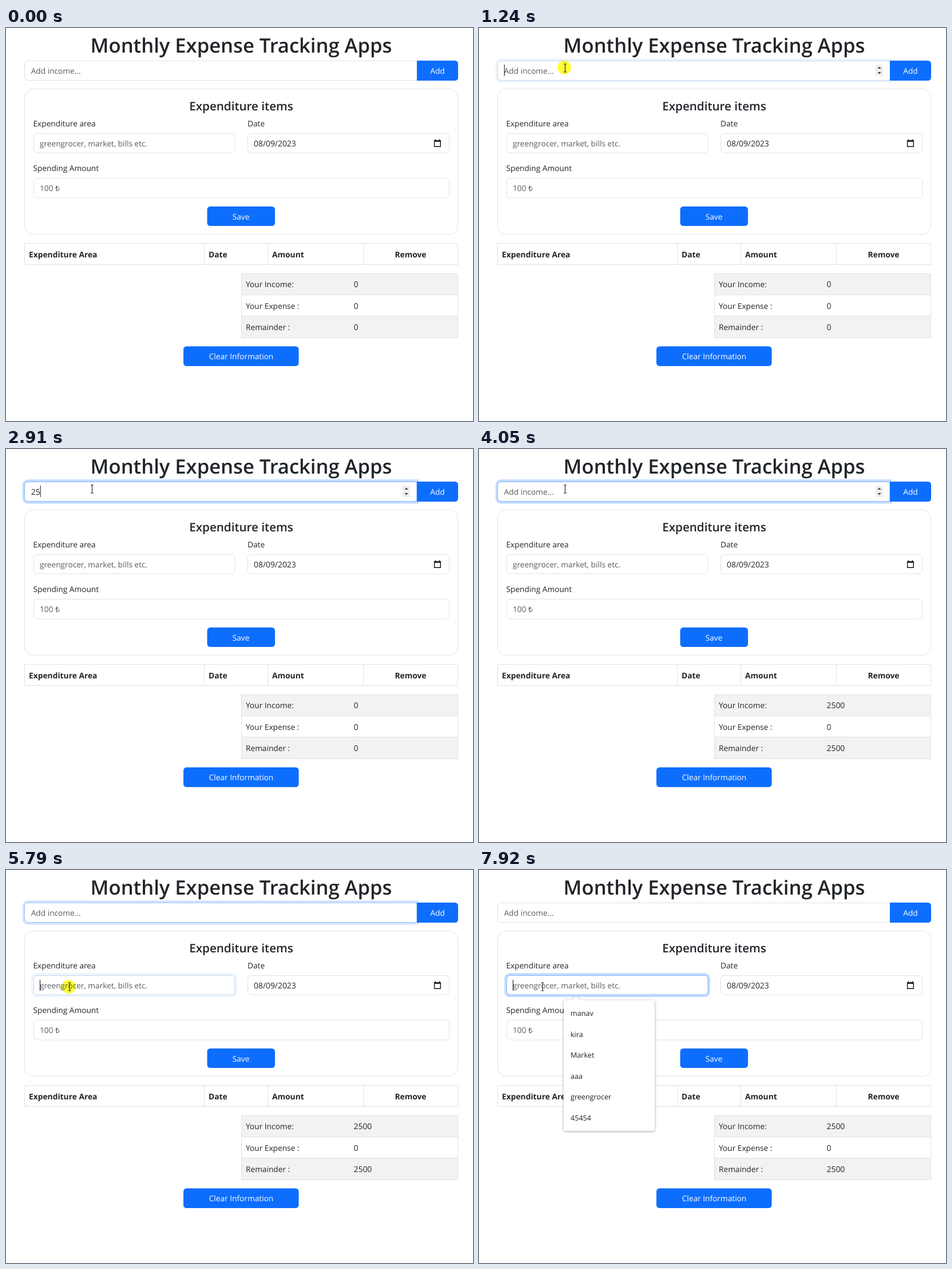
An HTML page that plays this animation: 816x687 px, repeating every 8000 ms.

```html
<!DOCTYPE html>
<html lang="en">
<head>
<meta charset="utf-8">
<title>Monthly Expense Tracking Apps</title>
<style>
html, body { margin: 0; width: 100%; height: 100%; overflow: hidden; background: #fff; }
svg { display: block; width: 816px; height: 687px; }
text { font: 13.7px "Open Sans", "Noto Sans", sans-serif; fill: #212529; text-rendering: geometricPrecision; }
.mid { text-anchor: middle; }
.h1 { font-size: 34.6px; font-weight: 600; }
.h2 { font-size: 20.6px; font-weight: 600; }
.th text { font-weight: 700; font-size: 13.8px; }
.num { font-size: 13.9px; }
.hint { fill: #595c5f; }
.box { fill: #fff; stroke: #dee2e6; }
.line { fill: none; stroke: #dee2e6; }
.btn { fill: #0d6efd; }
.label { fill: #fff; }
.ring .glow { fill: none; stroke: #c2dbfe; stroke-width: 3.7; }
.ring .edge { fill: none; stroke: #86b7fe; }
.caret { fill: #111; }
#menu text { font-size: 12.6px; fill: #202124; }
#menu .panel { fill: #fff; filter: drop-shadow(0 1px 2px rgba(0,0,0,.35)); }
</style>
</head>
<body>
<svg viewBox="0 0 816 687">
  <text class="h1 mid" x="411" y="43">Monthly Expense Tracking Apps</text>

  <path class="box" d="M718 57.5H38a5.5 5.5 0 0 0-5.5 5.5V86a5.5 5.5 0 0 0 5.5 5.5H718z"/>
  <g class="ring" id="ring1">
    <path class="glow" d="M719.5 55.2H38a7.5 7.5 0 0 0-7.3 7.5V86a7.5 7.5 0 0 0 7.3 7.6H719.5z"/>
    <path class="edge" d="M718 57.5H38a5.5 5.5 0 0 0-5.5 5.5V86a5.5 5.5 0 0 0 5.5 5.5H718z"/>
  </g>
  <path class="btn" d="M718 57H784.5a5.5 5.5 0 0 1 5.5 5.5V86.5a5.5 5.5 0 0 1-5.5 5.5H718z"/>
  <text class="label mid" x="754" y="80">Add</text>
  <g id="spin">
    <rect x="692" y="64" width="14" height="20" fill="#efefef"/>
    <path d="M696.3 71l3.2-3.6 3.2 3.6zM696.3 77l3.2 3.6 3.2-3.6z" fill="#444"/>
  </g>
  <text id="income" x="43.7" y="80"></text>
  <rect class="caret" id="caret1" y="64" width="1" height="20"/>

  <rect class="box" x="32.5" y="106.5" width="757" height="254" rx="14.5"/>
  <text class="h2 mid" x="411" y="143.5">Expenditure items</text>
  <text x="47.5" y="172">Expenditure area</text>
  <text x="422" y="172">Date</text>
  <text x="47.5" y="249.5">Spending Amount</text>
  <rect class="box" x="48.5" y="184.5" width="351.5" height="33.5" rx="5.5"/>
  <g class="ring" id="ring2">
    <rect class="glow" x="46.2" y="182.2" width="355.8" height="38.1" rx="7.3"/>
    <rect class="edge" x="48.5" y="184.5" width="351.5" height="33.5" rx="5.5"/>
  </g>
  <text class="hint" x="59" y="207">greengrocer, market, bills etc.</text>
  <rect class="caret" id="caret2" x="59" y="192" width="1" height="19"/>
  <rect class="box" x="422.5" y="184.5" width="352" height="33.5" rx="5.5"/>
  <text class="num" x="433" y="207">08/09/2023</text>
  <path d="M748.6 196.6h10.6v10.6h-10.6zM748.6 198.3h10.6M750.5 194.5v2M757.3 194.5v2" fill="none" stroke="#111" stroke-width="1.4"/>
  <rect class="box" x="48.5" y="262.5" width="726" height="34.5" rx="5.5"/>
  <text class="hint" x="59" y="285">100 ₺</text>
  <rect class="btn" x="351.5" y="312" width="118.5" height="34" rx="5.5"/>
  <text class="label mid" x="410.5" y="334.5">Save</text>

  <path class="line" d="M32.5 376.5H789.5V413.5H32.5zM346.5 376.5V413.5M457.5 376.5V413.5M624.5 376.5V413.5"/>
  <g class="th">
    <text x="40" y="400.5">Expenditure Area</text>
    <text x="354" y="400.5">Date</text>
    <text x="465" y="400.5">Amount</text>
    <text class="mid" x="707" y="400.5">Remove</text>
  </g>

  <path d="M411 429h379v37.5H411zM411 503.5h379V541.5H411z" fill="#f2f2f2"/>
  <path class="line" d="M411.5 429.5H789.5V541.5H411.5zM411.5 466.5H789.5M411.5 503.5H789.5"/>
  <text x="419" y="453">Your Income:</text>
  <text x="419" y="490.5">Your Expense :</text>
  <text x="419" y="528">Remainder :</text>
  <text class="num total" x="607.5" y="453">0</text>
  <text class="num" x="607.5" y="490.5">0</text>
  <text class="num total" x="607.5" y="528">0</text>

  <rect class="btn" x="310" y="556.5" width="201.5" height="34.5" rx="5.5"/>
  <text class="label mid" x="411" y="579">Clear Information</text>

  <g id="menu">
    <path class="panel" d="M151 227.5H162.5L169.5 220.5 176.5 227.5H304a3 3 0 0 1 3 3V453a3 3 0 0 1-3 3H151a3 3 0 0 1-3-3V230.5a3 3 0 0 1 3-3z"/>
  </g>

  <circle id="click" r="12" fill="#ffff3c" style="mix-blend-mode:multiply"/>
  <path id="arrow" d="M.5.5V14L3.7 11 5.9 15.8 7.9 14.9 5.7 10.2H10z" fill="#fff" stroke="#111" stroke-width=".9"/>
  <path id="beam" d="M-2.5-7h2l.5.5.5-.5h2M0-6.5V6.5M-2.5 7h2l.5-.5.5.5h2" fill="none" stroke="#222" stroke-width="1.1"/>
</svg>
<script>
const LOOP = 8000, SVG = "http://www.w3.org/2000/svg";
const el = id => document.getElementById(id);
const show = (id, on) => el(id).style.display = on ? "" : "none";
const within = (t, a, b) => t >= a && t < b;
const place = (id, x, y) => el(id).setAttribute("transform", `translate(${x} ${y})`);

["manav", "kira", "Market", "aaa", "greengrocer", "45454"].forEach((word, i) => {
  const item = document.createElementNS(SVG, "text");
  item.setAttribute("x", 160);
  item.setAttribute("y", 255 + 36.5 * i);
  item.textContent = word;
  el("menu").append(item);
});

// pointer path: time, x, y
const path = [
  [70, 735, 665], [140, 650, 530], [200, 567, 410], [270, 466, 300], [400, 290, 112],
  [560, 185, 32], [700, 155, 50], [830, 150.5, 65], [899, 150.5, 65], [900, 150.5, 70],
  [4900, 150.5, 70], [5110, 128, 98], [5310, 111, 150], [5520, 107, 212], [5660, 111, 204]
];
const keys = [[2710, "2"], [2910, "25"], [3300, "250"], [3430, "2500"], [4050, ""]];
// moments at which the caret turns on, then off
const blinks1 = [[1240, 1780], [2310, 3980], [4510, 5040], [5570, 5790]];
const blinks2 = [[5790, 6330], [6860, 7410], [7920, LOOP]];

function pointer(t) {
  const i = path.findIndex(k => k[0] > t);
  if (i < 0) return path.at(-1).slice(1);
  const [t0, x0, y0] = path[i - 1], [t1, x1, y1] = path[i];
  const p = (t - t0) / (t1 - t0);
  return [x0 + (x1 - x0) * p, y0 + (y1 - y0) * p];
}

// ring fades in and out over 150 ms
const fade = (t, on, off) =>
  Math.max(0, Math.min(1, (t - on + 40) / 150, (off + 110 - t) / 150));

function draw(t) {
  const typed = (keys.findLast(k => k[0] <= t) || [0, ""])[1];
  const income = el("income");
  income.textContent = typed || "Add income...";
  income.setAttribute("class", typed ? "num" : "hint");
  el("caret1").setAttribute("x", 43.8 + typed.length * 7.95);
  document.querySelectorAll(".total").forEach(n => n.textContent = t < 4050 ? "0" : "2500");

  el("ring1").style.opacity = t < 1240 ? 0 : fade(t, 1240, 5790);
  el("ring2").style.opacity = t < 5790 ? 0 : fade(t, 5790, LOOP);
  show("caret1", blinks1.some(b => within(t, ...b)));
  show("caret2", blinks2.some(b => within(t, ...b)));
  show("menu", t >= 5860);

  const visible = t >= 70, [x, y] = visible ? pointer(t) : [0, 0];
  const inIncome = within(y, 57, 92) && x < 718;
  const overText = inIncome || (y < 46 && x > 148) ||
    (x < 156 && within(y, 159, 176)) || (x < 400 && within(y, 184, 218));
  show("spin", within(t, 1240, 5790) || (visible && inIncome));
  show("arrow", visible && !overText);
  show("beam", visible && overText);
  place("arrow", x, y);
  place("beam", x, y);
  show("click", within(t, 1240, 1450) || within(t, 5790, 6000));
  place("click", x - 1.5, y - (t < 3000 ? 1 : 0));
}

function tick() {
  draw(performance.now() % LOOP);
  requestAnimationFrame(tick);
}
tick();
</script>
</body>
</html>
```
